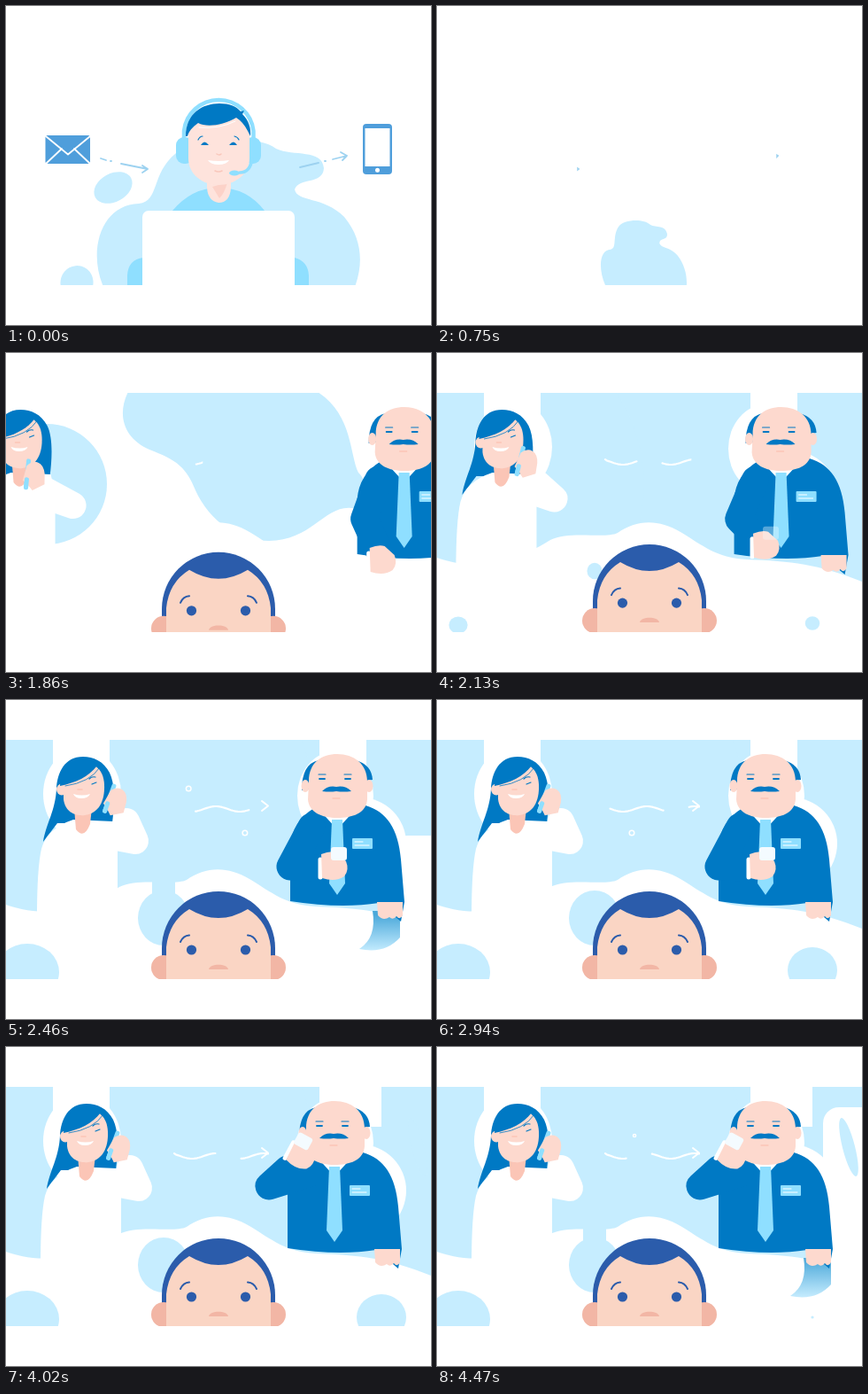
An HTML page with a canvas that plays this animation: 480x360 px, repeating every 4.5 s.

```html
<!DOCTYPE html>
<html lang="en">
<head>
<meta charset="utf-8">
<title>Support call</title>
<style>
html, body { margin: 0; width: 100%; height: 100%; overflow: hidden; background: #fff; }
canvas { display: block; width: 480px; height: 360px; }
</style>
</head>
<body>
<canvas id="stage" width="480" height="360"></canvas>
<script>
const g = document.getElementById('stage').getContext('2d');
const LOOP = 4500;
const PALE = '#c6edff', SKY = '#8fdfff', BLUE = '#0079c4', ICON = '#4f9edb', NAVY = '#2b5cab';
const SKIN = '#fdd9ce', SHADE = '#fbc5b6', FAIR = '#fee3dc', WHITE = '#fff';

const clamp = v => Math.max(0, Math.min(1, v));
const span = (t, a, b) => clamp((t - a) / (b - a));
const easeIn = p => p * p * p;
const easeOut = p => 1 - (1 - p) ** 3;
const smooth = p => p * p * (3 - 2 * p);
const mix = (a, b, p) => a + (b - a) * p;

function shape(d, color) {
  g.fillStyle = color;
  g.fill(new Path2D(d));
}
function line(d, color, width) {
  g.strokeStyle = color;
  g.lineWidth = width;
  g.lineCap = g.lineJoin = 'round';
  g.stroke(new Path2D(d));
}
function oval(x, y, rx, ry, color, turn = 0) {
  g.fillStyle = color;
  g.beginPath();
  g.ellipse(x, y, Math.max(0, rx), Math.max(0, ry), turn, 0, 7);
  g.fill();
}
function box(x, y, w, h, r, color) {
  g.fillStyle = color;
  g.beginPath();
  g.roundRect(x, y, w, h, r);
  g.fill();
}
function shifted(x, y, draw) {
  g.save();
  g.translate(x, y);
  draw();
  g.restore();
}
// Scales about x,y; lean shears the top to the right
function scaled(x, y, sx, sy, draw, lean = 0) {
  g.save();
  g.translate(x, y);
  g.transform(sx, 0, -lean, sy, 0, 0);
  g.translate(-x, -y);
  draw();
  g.restore();
}
function clipped(x, y, w, h, draw) {
  g.save();
  g.beginPath();
  g.rect(x, y, w, h);
  g.clip();
  draw();
  g.restore();
}

// ---- Help desk ----
const CLOUD = 'M110 317C92 275 108 224 150 223C174 220 163 190 192 166C212 148 285 144 305 161' +
  'C325 170 357 161 359 183C358 202 331 193 326 207C329 222 358 214 382 238C402 262 404 290 394 317Z';

function agent() {
  shape('M137 340V304Q138 286 155 284L188 231Q210 205 240 205Q272 205 292 231L326 284Q341 288 342 304V340Z', SKY);
  shape('M227 192H254V205Q253 222 240 222Q228 220 227 205Z', FAIR);
  shape('M233 204L250 199Q247 211 241 217Z', '#fcd2c8');
  line('M201 155V141A39.5 39.5 0 0 1 279.500 141V155', SKY, 4.500);
  box(192, 148, 20, 30, 9, SKY);
  box(269, 148, 19, 30, 9, SKY);
  shape('M206 142Q211 119 240 118Q270 119 275 142V172C275 190 258 202 240 202C222 202 206 190 206 172Z', FAIR);
  shape('M203 147C203 121 222 110 241 110C252 110 260 113 265 119L269 118L267 122C274 129 277 138 276 147L273 141Q268 131 260 126C245 135 226 137 217 132C210 137 206 142 205 147Z', BLUE);
  line('M218 137Q241 139 259 130', WHITE, 1);
  line('M217 151Q219 147 222 147M258 147Q262 148 263 151', BLUE, 1.200);
  shape('M220 157Q224 150 229 157ZM252 157Q257 150 261 157Z', BLUE);
  shape('M228 174Q240 176 252 174Q249 179 240 179Q231 179 228 174Z', WHITE);
  line('M238 167Q241 169 243 167M236 186Q240 188 244 186', '#f9c7bb', 1.500);
  line('M278 172Q276 188 264 188', SKY, 3.500);
  oval(258, 188.500, 6, 3, SKY);
  box(154, 231, 172, 120, 7, WHITE);
}
function envelope() {
  box(44.500, 146, 50.500, 32, 2, ICON);
  line('M45 147L70 167.500L95 147M45 178L63 161M95 178L77 161', WHITE, 1.800);
}
function phone() {
  box(403, 133, 33, 57, 4, ICON);
  box(405.500, 138, 28, 43, 0, WHITE);
  oval(419.500, 185.300, 2.500, 2.500, WHITE);
}
// The tails are wiped away toward the tips
function arrows(p) {
  const wipe = (from, to, d) => {
    const x = mix(from, to, p);
    clipped(x, 155, to - x, 40, () => line(d, '#9dd2f0', 1.800));
  };
  wipe(105, 162, 'M107 172L113 174M118 175H119M130 178L160 184M154 180L160 184L154 188');
  wipe(330, 387, 'M332 182L353 177M360 175H361M369 173L385 169M378 165L385 169L380 174');
}
function desk(t) {
  const away = easeIn(span(t, 0, 620));
  const small = 1 - easeIn(span(t, 150, 690));
  const fold = easeIn(span(t, 250, 750));
  const left = 1 - smooth(span(t, 750, 990));
  scaled(229, 317, mix(1, 0.320, fold) * left, mix(1, 0.450, fold) * left,
    () => shape(CLOUD, PALE), -0.080 * fold * left);
  oval(121, 205, 23 * small, 16 * small, PALE, -0.500);
  oval(80, 312, 18.500 * small, 19 * small, PALE, 0.300);
  shifted(0, 230 * away, agent);
  shifted(-110 * away, 0, envelope);
  shifted(90 * away, 0, phone);
  arrows(span(t, 60, 800));
}

// ---- Callers ----
const FLOOD = 'M140 40C124 68 132 96 162 109C194 121 204 130 214 155C230 190 262 212 297 212' +
  'C345 212 360 172 390 175C412 176 410 145 398 135C388 115 392 70 352 44V40Z';
const GROUND = 'M0 231C25 240 70 248 128 211C150 200 190 210 204 203C225 188 250 187 275 202' +
  'C300 217 315 231 350 233C400 235 430 238 480 258V320H0Z';

function backdrop(t) {
  const grow = t < 1860 ? easeOut(span(t, 1380, 1860)) : 1 + 3.500 * smooth(span(t, 1860, 2400));
  scaled(260, 110, grow, grow, () => shape(FLOOD, PALE));
  oval(46, 148, 68 * grow, 68 * grow, PALE);
  shape(GROUND, WHITE);
  if (t < 1950) return;

  // Pools open and close on one shared pulse
  const pulse = Math.cos((t - 2460) / 960 * 2 * Math.PI);
  const rise = smooth(span(t, 1980, 2400));
  const open = clamp(0.600 + 1.500 * pulse) * rise;
  const lobe = clamp(1.500 * pulse - 0.300) * rise;
  const drain = smooth(span(t, 2940, 3630));

  oval(178, 246, 29 * rise, 31 * rise, PALE);
  box(178 - 13 * open, 190, 26 * open, 55, 0, PALE);
  oval(24, 307, 36 * rise, 32 * rise, PALE);
  oval(424, 305, 28 * rise * (1 - lobe), 26 * rise * (1 - lobe), PALE);

  const top = 258 - open * mix(105, 190, drain);
  box(436, top, 70, 262 - top, 18, WHITE);
  oval(465, 113, 7 * drain, 34 * drain, PALE, -0.250);

  box(53, 40, 64, 60, 0, WHITE);
  oval(86, 106, 44, 52, WHITE);
  box(354, 40, mix(53, 70, drain), 50, 0, WHITE);
  oval(372, 108, 43, 50, WHITE);
  oval(400, 162, 52, 52, WHITE);

  if (lobe > 0) {
    const fade = g.createLinearGradient(0, 242, 0, 284);
    fade.addColorStop(0, '#4aa8da');
    fade.addColorStop(1, PALE);
    g.globalAlpha = lobe;
    shape('M414 238H445V268Q428 287 399 281Q419 268 414 238Z', fade);
    g.globalAlpha = 1;
  }
}

function signal(t) {
  const ahead = t - 2460;
  const reach = mix(190, 298, smooth(span(t, 1640, 2250)));
  let wave = 'M190 120.200';
  for (let x = 192; x <= 296; x += 2) wave += `L${x} ${123 + 3 * Math.cos((x - 210) / 54 * 2 * Math.PI)}`;
  clipped(188, 95, reach - 188, 60, () => {
    g.setLineDash([62, 30]);
    g.lineDashOffset = -25 - 0.152 * ahead;
    line(wave, WHITE, 2.200);
    g.setLineDash([]);
    line('M289 114L296 119.500L289 125', WHITE, 2);
  });
  const ring = (x, y, r) => {
    if (ahead < -200 || r < 0.400) return;
    g.beginPath();
    g.arc(x, y, r, 0, 7);
    g.strokeStyle = WHITE;
    g.lineWidth = 1.500;
    g.stroke();
  };
  const p = (ahead + 960) / 960 % 1;
  ring(206 + 180 * p, 100, 2.800 * (1 - p / 0.220));
  ring(270 - 0.104 * ahead, 150, 2.800 * (1 - span(t, 3000, 3700)));
}

function woman(t) {
  const p = smooth(span(t, 1860, 2350));
  const hx = mix(105, 127, p), hy = mix(137, 113, p);
  shape('M91 64C70 64 62 82 61 100C60 125 49 140 46 160L62 139H124C127 115 127 94 121 82C114 69 103 64 91 64Z', BLUE);
  shape('M80 135Q50 145 44 168Q39 190 39 246H130V160L125 137Z', WHITE);
  shape('M81 122H101L99 140Q92 158 83 146Z', SHADE);
  oval(67, 101, 6, 6.500, SKIN);
  shape('M69 92L69 112C71 128 84 131 93 130C108 128 116 115 115 95C114 78 104 72 95 72Z', SKIN);
  shape('M65 97C83 93 97 87 107 74L99 66L78 68L66 82Z', BLUE);
  line('M71 97Q99 93 110 76', BLUE, 0.800);
  line('M98 89Q101 86 105 87M101 95L106 93', BLUE, 1.200);
  line('M85 101L90 101', SHADE, 1.500);
  shape('M80 106Q90 109 99 106Q97 111 89 111Q82 111 80 106Z', WHITE);
  line(`M113 152L150 ${mix(172, 159, p)}L${hx + 13} ${hy + 24}`, WHITE, 30);
  shifted(hx, hy, () => {
    g.rotate(mix(0.100, 0.350, p));
    box(-9, -17, 5, 34, 2, SKY);
    shape('M-8 -9Q-2 -16 4 -14Q11 -12 13 -2L14 10L1 18Q-7 10 -11 8Z', SKIN);
    box(-9, 4, 5, 14, 2, SKY);
  });
}

function man(t) {
  const lift = smooth(span(t, 1950, 2400)), ear = smooth(span(t, 3000, 3540));
  const joint = (hang, hold, call) => mix(mix(hang, hold, lift), call, ear);
  const elbow = [joint(326, 318, 297), joint(187, 188, 157)];
  const wrist = [joint(341, 352, 318), joint(220, 190, 138)];
  const hand = [joint(346, 367, 334), joint(234, 188, 122)];

  shape('M345 122Q320 137 318 165V227Q375 236 418 229L443 250L447 228L443 180C440 145 427 126 403 119Z', BLUE);
  shape('M348 121L371 146L394 121Z', WHITE);
  shape('M365 135H377L380 207L371 220L362 207Z', SKY);
  box(388, 156, 23, 12, 1, SKY);
  line('M391 160H400M391 164H407', WHITE, 1);
  shape('M331 102Q331 72 350 68H392Q410 73 411 90Z', BLUE);
  oval(335, 97, 4.500, 7, SKIN);
  oval(407, 97, 4.500, 7, SKIN);
  shape('M339 92C339 70 354 61 371 61C390 61 405 72 405 92V112C404 128 388 133 371 133C354 133 339 127 338 112Z', SKIN);
  line('M350 84H358M379 84H387', BLUE, 1.200);
  line('M351 89H357M380 89H386', BLUE, 1.800);
  shape('M354 103Q361 96 370 98Q380 96 387 103Q378 104 370 103Q363 104 354 103Z', BLUE);
  line('M366 111H374', SHADE, 1.300);
  line(`M342 143L${elbow}L${wrist}`, BLUE, 31);
  shifted(...hand, () => {
    g.rotate(0.500 * ear);
    line('M-15 12V-8', WHITE, 5);
    shape('M-14 -14Q-4 -18 3 -16L14 -6Q18 4 12 11Q2 18 -13 13Z', SKIN);
    g.globalAlpha = lift;
    box(mix(-3, -15, ear), -22, 18, 15, 3, '#f4fbff');
    g.globalAlpha = 1;
  });
  shape('M416 228H445V243Q442 249 438 244Q434 249 430 245Q423 250 417 243Z', SKIN);
}

function boy() {
  shape('M176 290V280A64 64 0 0 1 304 280V290Z', NAVY);
  oval(178, 302, 14, 14, '#f2b6a5');
  oval(302, 302, 14, 14, '#f2b6a5');
  shape('M181 330V279Q184 250 207 236Q240 256 273 236Q296 250 299 279V330Z', '#fad5c4');
  oval(209.500, 282, 5.600, 5.600, NAVY);
  oval(270.500, 282, 5.600, 5.600, NAVY);
  line('M197 273Q200 266 207 265.500M273 265.500Q280 266 283 273', NAVY, 2);
  shape('M229 304C230 297 250 297 251 304Z', '#f2b6a5');
}

function callers(t) {
  const late = 1 - easeOut(span(t, 1500, 2500));
  const settle = 1 - smooth(span(t, 2460, 2940));
  backdrop(t);
  signal(t);
  shifted(-270 * late - 4 * settle, 0, () => woman(t));
  shifted(290 * late + 3 * settle, 0, () => man(t));
  shifted(0, 110 * (1 - easeOut(span(t, 1400, 2210))), boy);
}

const start = performance.now();
function frame(now) {
  const t = Math.max(0, now - start) % LOOP;
  g.fillStyle = WHITE;
  g.fillRect(0, 0, 480, 360);
  if (t < 990) clipped(0, 0, 480, 315, () => desk(t));
  else if (t >= 1380) clipped(0, 45, 480, 270, () => callers(t));
  requestAnimationFrame(frame);
}
requestAnimationFrame(frame);
</script>
</body>
</html>
```
